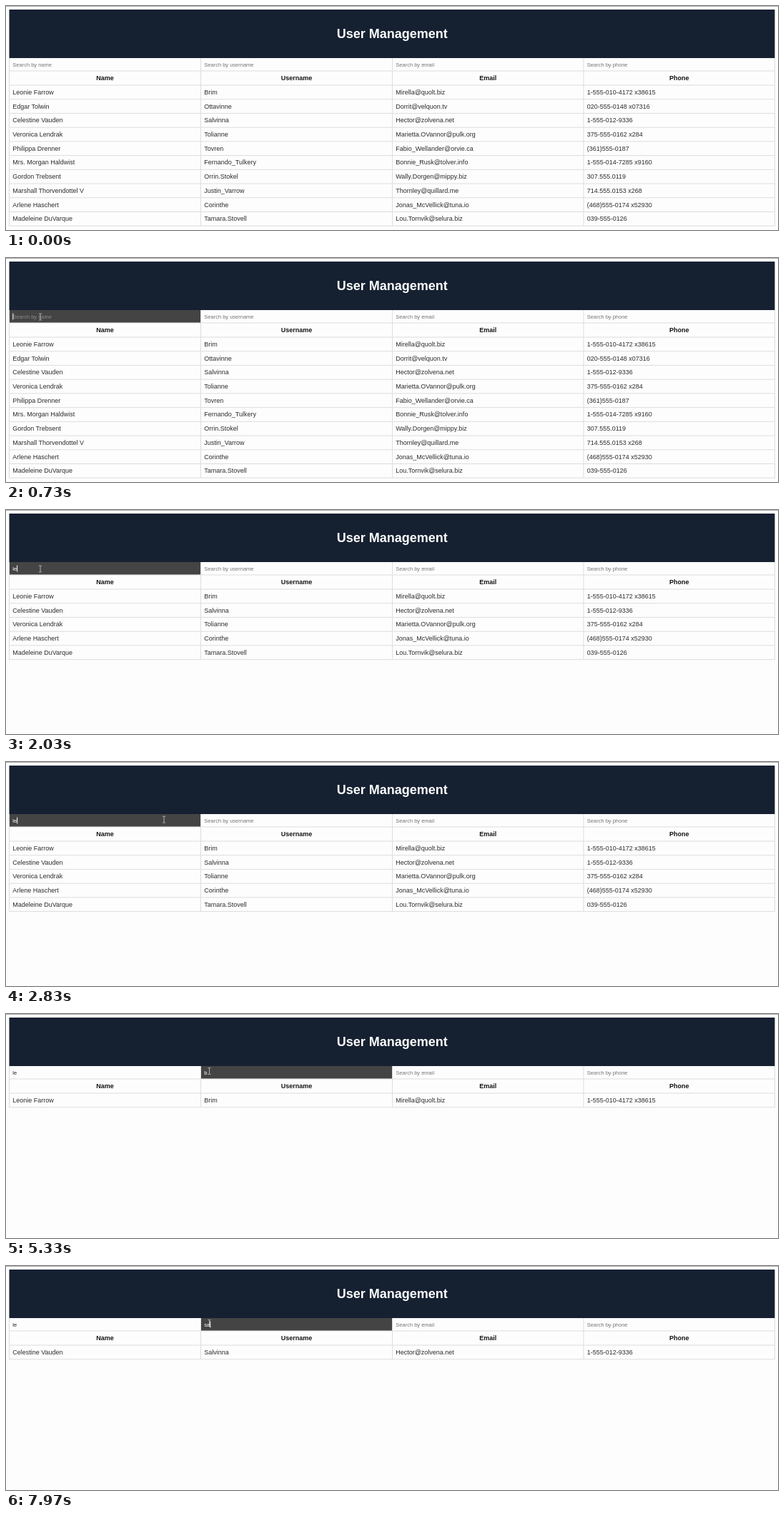
These frames come from a looping animation (1080x314 px, 8 s). An HTML page:

```html
<!DOCTYPE html>
<html lang="en">
<head>
<meta charset="utf-8">
<title>User Management</title>
<style>
  html, body { margin: 0; width: 100%; height: 100%; overflow: hidden; background: #fdfdfd; }
  svg { display: block; width: 1080px; height: 314px; font: 9px "Liberation Sans", Arial, sans-serif; }
  text { fill: #2c2c2c; white-space: pre; }
  .title { font-size: 18px; font-weight: bold; fill: #fdfdfd; text-anchor: middle; }
  .head { font-weight: bold; fill: #141414; text-anchor: middle; }
  .field { font-size: 7.5px; fill: #222; }
  .field.hint { fill: #757575; }
  .field.focus { fill: #fdfdfd; }
  .field.hint.focus { fill: #8a8a8a; }
  .line { stroke: #dddde2; fill: none; }
</style>
</head>
<body>
<svg id="stage" viewBox="0 0 1080 314"></svg>
<script>
const LOOP = 8000, BLINK = 530, ROW = 19.72, TOP = 111;
const EDGES = [4.5, 272.5, 540.5, 808, 1075.5];
const HEADS = ["Name", "Username", "Email", "Phone"];
const USERS = [
  ["Leonie Farrow", "Brim", "Mirella@quolt.biz", "1-555-010-4172 x38615"],
  ["Edgar Tolwin", "Ottavinne", "Dorrit@velquon.tv", "020-555-0148 x07316"],
  ["Celestine Vauden", "Salvinna", "Hector@zolvena.net", "1-555-012-9336"],
  ["Veronica Lendrak", "Tolianne", "Marietta.OVannor@pulk.org", "375-555-0162 x284"],
  ["Philippa Drenner", "Tovren", "Fabio_Wellander@orvie.ca", "(361)555-0187"],
  ["Mrs. Morgan Haldwist", "Fernando_Tulkery", "Bonnie_Rusk@tolver.info", "1-555-014-7285 x9160"],
  ["Gordon Trebsent", "Orrin.Stokel", "Wally.Dorgen@mippy.biz", "307.555.0119"],
  ["Marshall Thorvendottel V", "Justin_Varrow", "Thornley@quillard.me", "714.555.0153 x268"],
  ["Arlene Haschert", "Corinthe", "Jonas_McVellick@tuna.io", "(468)555-0174 x52930"],
  ["Madeleine DuVarque", "Tamara.Stovell", "Lou.Tornvik@selura.biz", "039-555-0126"]
];

// Each step: start time, focused field, name query, username query
const STEPS = [
  [0, -1, "", ""],
  [550, 0, "", ""],
  [1430, 0, "l", ""],
  [1600, 0, "le", ""],
  [3000, 1, "le", ""],
  [3700, 1, "le", "b"],
  [6230, 1, "le", ""],
  [7450, 1, "le", "s"],
  [7700, 1, "le", "sa"]
];

// Pointer path: time, x, y
const PATH = [[330, 60, 76], [520, 48, 82.5], [2600, 48, 82.5], [2950, 284.5, 80]];

const stage = document.getElementById("stage");

function add(tag, attrs, parent = stage, content = "") {
  const node = document.createElementNS("http://www.w3.org/2000/svg", tag);
  for (const key in attrs) node.setAttribute(key, attrs[key]);
  node.textContent = content;
  parent.appendChild(node);
  return node;
}

const show = (node, on) => node.setAttribute("visibility", on ? "visible" : "hidden");
const verticals = (y, h) => EDGES.map(x => `M${x} ${y}v${h}`).join("");

add("rect", { width: 1080, height: 1, fill: "#a6a8a6" });
add("rect", { x: 4.5, y: 5, width: 1071, height: 68, fill: "#152031" });
add("text", { x: 540.3, y: 44.6, class: "title" }, stage, "User Management");
add("path", { class: "line", d: verticals(73, 38) + "M4 91h1072M4 111h1072" });

const fields = HEADS.map((label, i) => {
  const x = EDGES[i], width = EDGES[i + 1] - x;
  add("text", { x: x + width / 2, y: 104.2, class: "head" }, stage, label);
  return {
    hint: "Search by " + label.toLowerCase(),
    fill: add("rect", { x: x + 0.5, y: 73, width: width - 1, height: 17.5, fill: "#444" }),
    text: add("text", { x: x + 4.8, y: 84.6 })
  };
});

const rows = USERS.map(user => {
  const node = add("g", {});
  add("path", { class: "line", d: verticals(0, ROW) + `M4 ${ROW}h1072` }, node);
  user.forEach((value, i) => add("text", { x: EDGES[i] + 4.7, y: 12.8 }, node, value));
  return { node, user };
});

const caret = add("rect", { y: 77.5, width: 1, height: 9, fill: "#fdfdfd" });
const pointer = add("path", {
  d: "M-2 -4.5h1.5l.5 .5l.5 -.5h1.5M0 -4v8M-2 4.5h1.5l.5 -.5l.5 .5h1.5",
  fill: "none", stroke: "#d0d0d0", "stroke-width": 0.8
});

function applyStep([, focus, ...queries]) {
  fields.forEach((field, i) => {
    const value = queries[i] || "";
    field.text.textContent = value || field.hint;
    field.text.setAttribute("class", "field" + (value ? "" : " hint") + (i === focus ? " focus" : ""));
    show(field.fill, i === focus);
  });
  let count = 0;
  for (const { node, user } of rows) {
    const match = queries.every((q, i) => user[i].toLowerCase().includes(q));
    show(node, match);
    if (match) node.setAttribute("transform", `translate(0 ${TOP + ROW * count++})`);
  }
  if (focus >= 0) {
    const typed = queries[focus] ? fields[focus].text.getComputedTextLength() : 0;
    caret.setAttribute("x", EDGES[focus] + 4.8 + typed);
  }
}

function pointerAt(t) {
  const next = PATH.findIndex(p => p[0] > t);
  if (next < 0) return PATH[PATH.length - 1].slice(1);
  if (next === 0) return PATH[0].slice(1);
  const a = PATH[next - 1], b = PATH[next];
  const k = (t - a[0]) / (b[0] - a[0]);
  const ease = k * k * (3 - 2 * k);
  return [1, 2].map(i => a[i] + (b[i] - a[i]) * ease);
}

let current = null;

function draw(t) {
  const step = STEPS.filter(s => s[0] <= t).pop();
  if (step !== current) applyStep(current = step);
  show(caret, step[1] >= 0 && Math.floor((t - step[0]) / BLINK) % 2 === 0);
  show(pointer, t >= PATH[0][0]);
  pointer.setAttribute("transform", `translate(${pointerAt(t)})`);
}

const start = performance.now();
function tick() {
  draw((performance.now() - start) % LOOP);
  requestAnimationFrame(tick);
}
tick();
</script>
</body>
</html>
```
